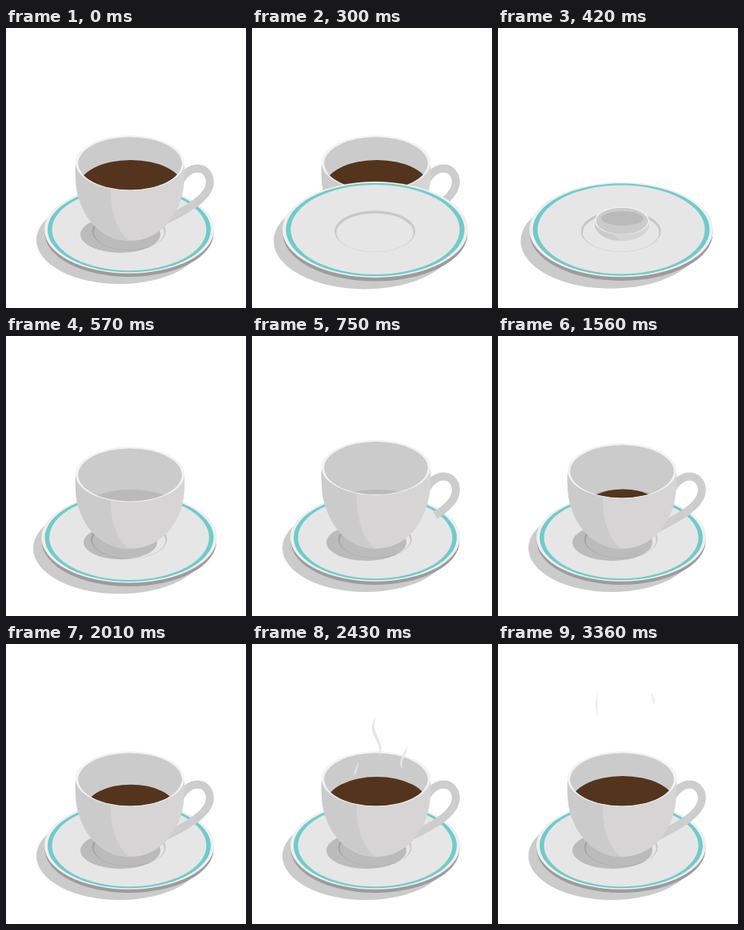
An HTML page with a canvas for the animation above (3750 ms loop, 300 by 350 pixels).

```html
<!DOCTYPE html>
<html lang="en">
<head>
<meta charset="utf-8">
<title>Coffee cup</title>
<style>
html, body { margin: 0; width: 100%; height: 100%; overflow: hidden; background: #fff; }
canvas { display: block; width: 300px; height: 350px; }
</style>
</head>
<body>
<canvas id="stage" width="300" height="350"></canvas>
<script>
const ctx = document.getElementById('stage').getContext('2d');
const LOOP = 3750, STEP = 30;
const SWAP = 330, POUR = 1290, FULL = 2550, STEAM_END = 3360;

// Progress from 0 to 1 between two times.
const linear = (t, from, to) => Math.min(1, Math.max(0, (t - from) / (to - from)));
const smooth = (t, from, to) => {
  const u = linear(t, from, to);
  return u * u * (3 - 2 * u);
};

function oval(x, y, rx, ry, color) {
  ctx.beginPath();
  ctx.ellipse(x, y, rx, ry, 0, 0, Math.PI * 2);
  ctx.fillStyle = color;
  ctx.fill();
}

function scaled(x, y, s, draw) {
  if (s <= 0) return;
  ctx.save();
  ctx.translate(x, y);
  ctx.scale(s, s);
  ctx.translate(-x, -y);
  draw();
  ctx.restore();
}

function saucer(scale, shade) {
  scaled(154, 252, scale, () => {
    oval(142, 265, 104, 55, '#cbcbcb');
    oval(154, 256.3, 105.5, 54.7, '#9c9c9c');
    oval(154, 252, 106, 54.7, '#efefef');
    oval(154, 252, 102, 53.2, '#70cbcb');
    oval(154, 252, 96.5, 51.2, '#e6e6e6');
    oval(153.7, 254, 46, 23.7, '#c8c8c8');
    oval(153.7, 255.4, 44, 22, '#e6e6e6');
  });
  scaled(143, 258, shade, () => oval(143, 258, 50, 23, 'rgba(0, 0, 0, 0.19)'));
}

function handle(part) {
  if (part <= 0) return;
  const length = 134;
  ctx.save();
  ctx.beginPath();
  ctx.moveTo(216, 194);
  ctx.bezierCurveTo(223, 181, 231, 175.5, 240, 175.5);
  ctx.bezierCurveTo(251, 176, 257, 187, 254, 198);
  ctx.bezierCurveTo(250, 213, 230, 225, 200, 240);
  ctx.lineWidth = 10;
  ctx.strokeStyle = '#cdcdcd';
  if (part < 1) ctx.setLineDash([length * part, 999]);
  ctx.stroke();
  ctx.restore();
}

function body(y) {
  const base = 266;
  const at = v => base - (base - v) * (base - y) / 97.5;
  ctx.beginPath();
  ctx.moveTo(87, y);
  ctx.bezierCurveTo(86, at(190), 88, at(206), 92, at(216));
  ctx.bezierCurveTo(101, at(243), 123, base, 155, base);
  ctx.bezierCurveTo(187, base, 209, at(243), 218, at(216));
  ctx.bezierCurveTo(222, at(206), 224, at(190), 223, y);
  ctx.closePath();
  ctx.fillStyle = '#d6d4d5';
  ctx.fill();

  // darker left side
  ctx.save();
  ctx.clip();
  ctx.beginPath();
  ctx.moveTo(80, y);
  ctx.lineTo(131, y);
  ctx.lineTo(131, at(205));
  ctx.bezierCurveTo(131, at(230), 138, at(254), 155, base + 1);
  ctx.lineTo(80, base + 1);
  ctx.fillStyle = '#cccbcc';
  ctx.fill();
  ctx.restore();
}

// A disc in the same perspective as the rim, rising and widening.
function coffee(t) {
  const left = 1 - linear(t, POUR, FULL);
  const rx = 64.8 - 22 * left;
  const ry = rx * 0.509;
  const top = 165 + 38 * left ** 1.5;
  oval(156, top + ry, rx, ry, '#55341d');
}

function cup(t, drop, part) {
  const y = 168.6 + drop;
  handle(part);
  body(y);
  oval(155, y, 68, 34.6, '#f3f3f3');
  ctx.save();
  oval(155, y + 0.7, 64.8, 33, '#cbcbcb');
  ctx.clip();
  oval(156, 210, 52, 18, '#bababa');
  if (t > POUR) coffee(t);
  ctx.restore();
}

// Each wisp follows a sine path upwards; its head outruns its tail.
const wisps = [
  { x: 156, sway: 4.5, mid: 118, bend: 9.4, width: 1.7, born: 2040, freed: 2140 },
  { x: 190.5, sway: -4, mid: 137, bend: 8.3, width: 1.2, born: 2240, freed: 2330 },
  { x: 129, sway: 6, mid: 104, bend: 18, width: 0.8, born: 2340, freed: 2500 }
];

function steam(t) {
  const surface = 165, ceiling = 61, n = 40;
  const rise = (since, speed) => Math.max(ceiling, surface - Math.max(0, t - since) * speed);
  ctx.save();
  ctx.globalAlpha = 1 - 0.3 * linear(t, 2800, STEAM_END);
  ctx.fillStyle = '#e6e6e6';
  for (const { x, sway, mid, bend, width, born, freed } of wisps) {
    const head = rise(born, 0.19), tail = rise(freed, 0.087);
    if (tail - head < 1) continue;
    ctx.beginPath();
    for (let i = -n; i <= n; i++) {
      const u = 1 - Math.abs(i) / n;
      const y = head + (tail - head) * u;
      const half = 0.3 + width * Math.sin(Math.PI * u);
      ctx.lineTo(x + sway * Math.sin((y - mid) / bend) + Math.sign(i) * half, y);
    }
    ctx.fill();
  }
  ctx.restore();
}

function draw(t) {
  ctx.fillStyle = '#fff';
  ctx.fillRect(0, 0, 300, 350);
  const size = 1.1 * smooth(t, 60, 310) - 0.1 * smooth(t, 310, 740);

  // the new saucer pops up over the full cup, then a new cup replaces it
  if (t < SWAP) {
    saucer(1, 1);
    cup(LOOP, 0, 1);
    saucer(size, 0);
    return;
  }
  saucer(size, smooth(t, SWAP, 620));
  const drop = 66 * (1 - smooth(t, SWAP, 650)) - 6 * (1 - smooth(t, 650, 930));
  scaled(155, 266, smooth(t, SWAP, 510), () => cup(t, drop, smooth(t, 570, 840)));
  steam(Math.min(t, STEAM_END));
}

const start = performance.now();
function tick() {
  const t = (performance.now() - start) % LOOP;
  draw(Math.floor(t / STEP) * STEP);
  requestAnimationFrame(tick);
}
tick();
</script>
</body>
</html>
```
